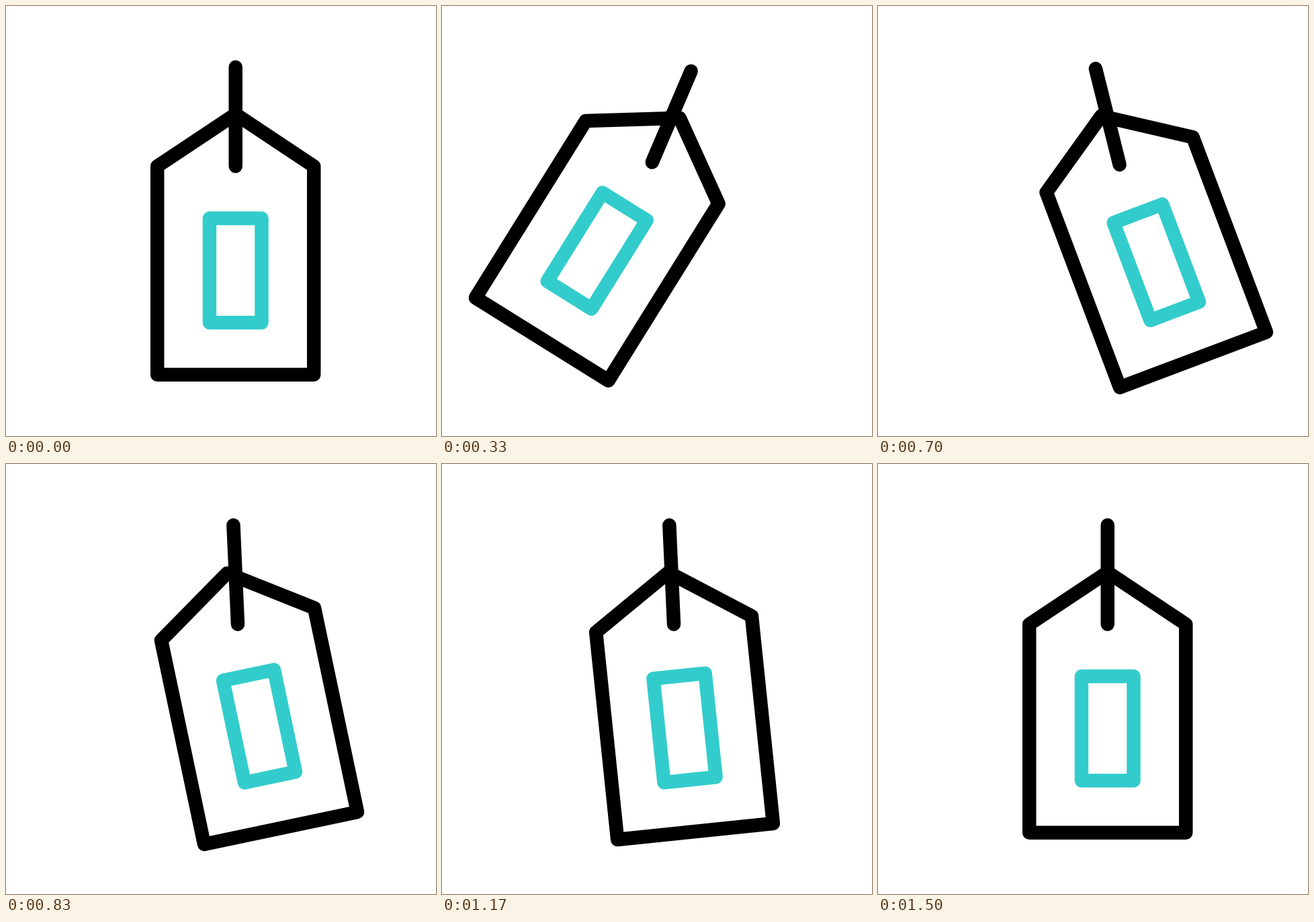
Recreate the animation shown at these times as an HTML page with a canvas. Size 640x640 px, loop 2000 ms.

```html
<!DOCTYPE html>
<html lang="en">
<head>
<meta charset="utf-8">
<title>Swinging tag</title>
<style>
  html, body { margin: 0; width: 100%; height: 100%; overflow: hidden; background: #fff; }
  canvas { display: block; width: 640px; height: 640px; }
</style>
</head>
<body>
<canvas id="stage" width="640" height="640"></canvas>
<script>
const ctx = document.getElementById('stage').getContext('2d');
const LOOP = 2000, FPS = 30, LAST_STEP = 45;
const CENTER = { x: 341.7, y: 164.75 };
const HALF_CORD = 73.75;

const ease = u => u * u * (3 - 2 * u);

// Eases from rest through a series of turning points, each { at: step, to: degrees }
function swing(begin, turns) {
  return step => {
    let from = { at: begin, to: 0 };
    for (const next of turns) {
      if (step < next.at) {
        const u = Math.max(0, (step - from.at) / (next.at - from.at));
        return from.to + (next.to - from.to) * ease(u);
      }
      from = next;
    }
    return from.to;
  };
}

// The cord turns about its middle, one half swing every 7 steps
const cordAngle = swing(0, [28.8, -14, 4.9, -2.6, 0].map((to, i) => ({ at: 14 + 7 * i, to })));

// The tag turns about the cord's lower end and lags behind
const tagAngle = swing(1, [
  { at: 17, to: 14.9 },
  { at: 23, to: -14.2 },
  { at: 29.5, to: 7.2 },
  { at: 37.5, to: -6.5 },
  { at: 45, to: 0 },
]);

const turn = degrees => ctx.rotate(degrees * Math.PI / 180);

function outline(points, color, closed = true) {
  ctx.beginPath();
  points.forEach(([x, y]) => ctx.lineTo(x, y));
  if (closed) ctx.closePath();
  ctx.strokeStyle = color;
  ctx.stroke();
}

// Points of a box centred on the axis of the tag
const box = (half, top, bottom) => [[half, top], [half, bottom], [-half, bottom], [-half, top]];

function draw(step) {
  ctx.fillStyle = '#fff';
  ctx.fillRect(0, 0, 640, 640);
  ctx.lineWidth = 20.5;
  ctx.lineCap = ctx.lineJoin = 'round';

  ctx.save();
  ctx.translate(CENTER.x, CENTER.y);
  turn(cordAngle(step));
  outline([[0, -HALF_CORD], [0, HALF_CORD]], '#000', false);

  ctx.translate(0, HALF_CORD);
  turn(tagAngle(step));
  outline([[0, -77.5], ...box(116.5, 0, 310.2)], '#000');
  outline(box(38.8, 77.5, 232.8), '#3cc');
  ctx.restore();
}

const start = performance.now();
function tick() {
  const time = (performance.now() - start) % LOOP;
  // The motion advances in whole steps
  draw(Math.min(LAST_STEP, Math.floor((time + 3.4) * FPS / 1000)));
  requestAnimationFrame(tick);
}
tick();
</script>
</body>
</html>
```
